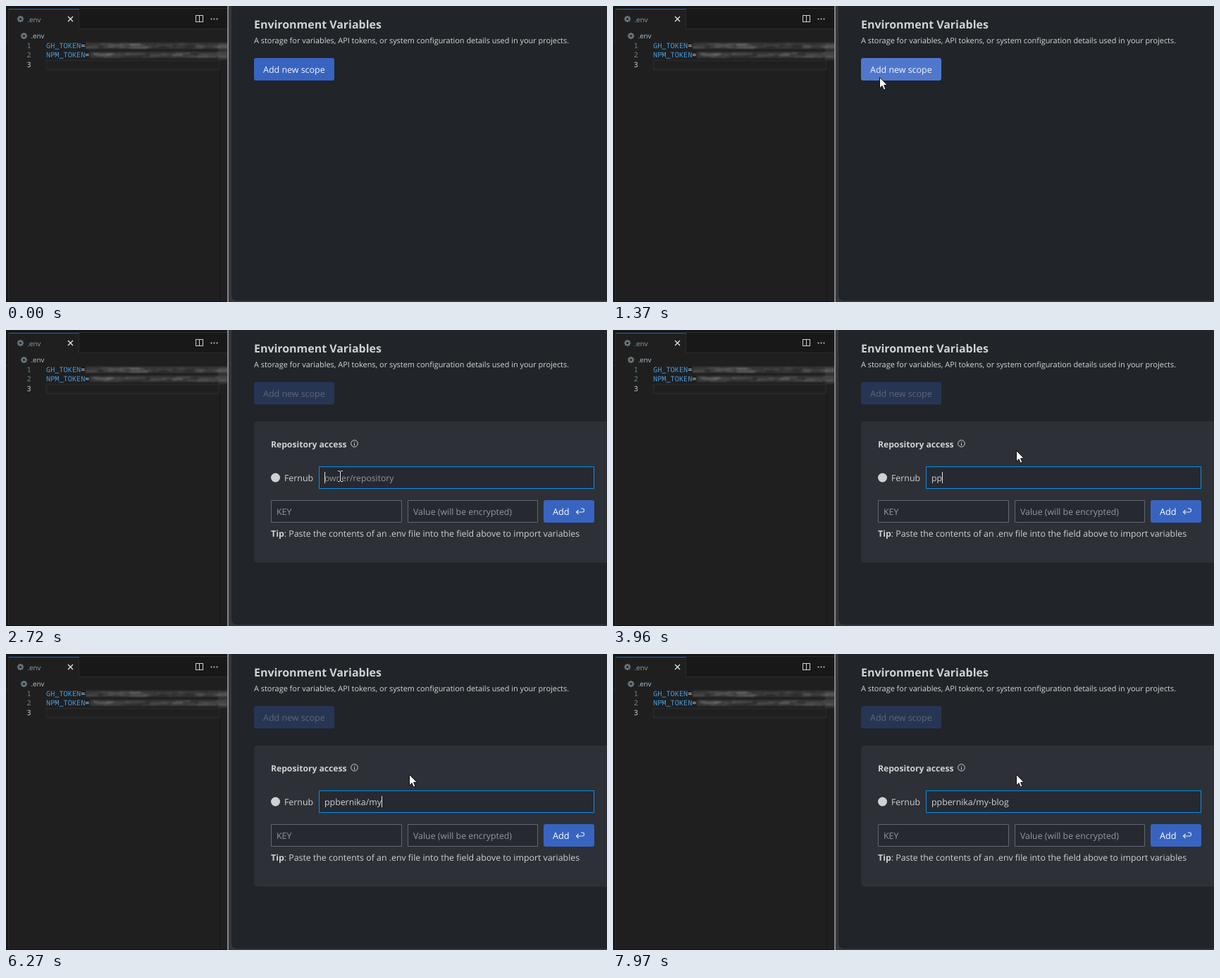
Write an HTML page with a canvas that moves like this. It is 853 px wide and 421 px high and loops after 8 s.

```html
<!DOCTYPE html>
<html lang="en">
<head>
<meta charset="utf-8">
<title>Environment Variables</title>
<style>
  html, body { margin: 0; width: 100%; height: 100%; overflow: hidden; background: #212428; }
  canvas { display: block; width: 853px; height: 421px; }
</style>
</head>
<body>
<canvas id="stage" width="853" height="421"></canvas>
<script>
const LOOP = 8000;
const PANEL_AT = 1560, FOCUS_AT = 2540;
const SANS = '"Open Sans", "Noto Sans", sans-serif';
const MONO = '"Noto Sans Mono", "DejaVu Sans Mono", monospace';
const TEXT = '#d0d2d4', HINT = '#93989d', BODY = 12.35;
const BLUE = '#3864c1', FIELD = '#262a30', EDGE = '#5f6675';

// Typing comes in bursts with an even gap between keys
const KEY_GAP = 130;
const BURSTS = [[3540, 'pp'], [4180, 'bernika'], [5400, '/'], [5980, 'my'], [6480, '-'], [6740, 'blog']];

const ctx = document.getElementById('stage').getContext('2d');

const clamp = v => Math.min(1, Math.max(0, v));
const progress = (t, from, to) => clamp((t - from) / (to - from));
const smooth = k => k * k * (3 - 2 * k);
const mix = (a, b, k) => a + (b - a) * k;

function rect(x, y, w, h, color) {
  ctx.fillStyle = color;
  ctx.fillRect(x, y, w, h);
}

function box(x, y, w, h, r, fill, line) {
  ctx.beginPath();
  ctx.roundRect(x, y, w, h, r);
  ctx.fillStyle = fill;
  ctx.fill();
  if (line) {
    ctx.strokeStyle = line;
    ctx.lineWidth = 1;
    ctx.stroke();
  }
}

function text(str, x, y, size = BODY, color = TEXT, weight = 400, family = SANS) {
  ctx.font = `${weight} ${size}px ${family}`;
  ctx.textRendering = 'geometricPrecision';
  ctx.fillStyle = color;
  ctx.fillText(str, x, y);
  return ctx.measureText(str).width;
}

function lines(color, width, ...paths) {
  ctx.strokeStyle = color;
  ctx.lineWidth = width;
  ctx.beginPath();
  for (const p of paths) {
    p.forEach(([x, y], i) => i ? ctx.lineTo(x, y) : ctx.moveTo(x, y));
  }
  ctx.stroke();
}

function disc(x, y, r, color) {
  ctx.fillStyle = color;
  ctx.beginPath();
  ctx.arc(x, y, r, 0, Math.PI * 2);
  ctx.fill();
}

function random(seed) {
  return () => {
    seed = (seed * 16807) % 2147483647;
    return seed / 2147483647;
  };
}

// Smeared grey strips that hide the two values
function makeSmudge(seed) {
  const layer = document.createElement('canvas');
  layer.width = 314;
  layer.height = 90;
  const g = layer.getContext('2d'), rnd = random(seed);
  g.filter = 'blur(1.2px)';
  [[113, 56.5], [119, 69.5]].forEach(([left, mid]) => {
    g.fillStyle = 'rgba(110,110,110,.32)';
    g.fillRect(left, mid - 4.5, 320 - left, 9);
    for (let i = 0; i < 45; i++) {
      const x = left + rnd() * (306 - left), w = 8 + rnd() * 24;
      const shade = rnd() < .4 ? 30 : 150;
      g.fillStyle = `rgba(${shade},${shade},${shade},${.2 + rnd() * .25})`;
      g.fillRect(x, mid - 3 + rnd() * 5, w, 2);
    }
  });
  g.fillStyle = 'rgba(95,95,95,.3)';
  g.fillRect(301, 53, 14, 24);
  return layer;
}
const smudges = [makeSmudge(41), makeSmudge(977)];

function gear(x, y, color) {
  for (let i = 0; i < 4; i++) {
    const a = i * Math.PI / 4, dx = Math.cos(a) * 4.7, dy = Math.sin(a) * 4.7;
    lines(color, 2, [[x - dx, y - dy], [x + dx, y + dy]]);
  }
  disc(x, y, 3.7, color);
  disc(x, y, 1.6, '#1f1f1f');
}

function drawEditor(t) {
  rect(0, 0, 314, 421, '#181818');
  rect(4, 33, 310, 388, '#1f1f1f');
  rect(4, 4, 99, 29, '#1f1f1f');
  rect(3, 3, 1, 418, '#2b2b2b');
  rect(0, 50, 3, 1, '#2b2b2b');
  rect(104, 3, 210, 1, '#2b2b2b');
  rect(103, 4, 1, 29, '#2b2b2b');
  rect(104, 32, 210, 1, '#2b2b2b');
  rect(4, 4, 100, 1, '#1470c4');
  rect(303, 78, 1, 343, '#141516');
  rect(0, 420, 314, 1, '#141414');

  gear(20.5, 18.5, '#69757c');
  text('.env', 30.5, 22.5, 9.8, '#929ca4');
  lines('#e8e8e8', 1.3, [[88, 15], [95, 22]], [[95, 15], [88, 22]]);
  ctx.strokeStyle = '#d0d0d0';
  ctx.lineWidth = 1;
  ctx.strokeRect(269.5, 13.5, 10, 9);
  lines('#d0d0d0', 1, [[274.5, 13.5], [274.5, 22.5]]);
  for (let i = 0; i < 3; i++) disc(291.5 + i * 4, 18.5, 1, '#d0d0d0');

  gear(25.5, 42.5, '#69757c');
  text('.env', 35.5, 46, 9.8, '#b4c4d0');

  ctx.strokeStyle = '#282828';
  ctx.strokeRect(57.5, 77.5, 245, 13);
  ['GH_TOKEN', 'NPM_TOKEN', ''].forEach((name, i) => {
    const y = 60 + i * 13.3;
    text(i + 1, 29.5, y, 10.25, name ? '#6f848f' : '#d0d0d0', 400, MONO);
    if (!name) return;
    const w = text(name, 57, y, 10.25, '#4a9fdf', 400, MONO);
    text('=', 57 + w, y, 10.25, '#d4d4d4', 400, MONO);
  });

  const shimmer = .12 + .12 * Math.sin(t / 420);
  smudges.forEach((layer, i) => {
    ctx.globalAlpha = i ? shimmer : 1 - shimmer;
    ctx.drawImage(layer, 0, 0);
  });
  ctx.globalAlpha = 1;
}

function drawPage(t, pointer) {
  rect(314, 0, 539, 421, '#35373a');
  rect(314, 0, 2, 421, '#858585');
  box(320, -10, 560, 429, 7, '#212428');

  text('Environment Variables', 352, 32, 15.95, TEXT, 700);
  text('A storage for variables, API tokens, or system configuration details used in your projects.',
       352, 53, 10.91, '#d6d8da');

  const open = t >= PANEL_AT;
  const over = pointer.x >= 352 && pointer.x < 466 && pointer.y >= 74 && pointer.y < 106;
  box(352, 74, 114, 32, 3, open ? '#273554' : over ? '#4f78cd' : BLUE);
  text('Add new scope', 365, 95, 12.46, open ? '#626770' : '#f4f6f9');
  if (open) drawPanel(t);
}

function drawPanel(t) {
  const focused = t >= FOCUS_AT;
  box(352, 130, 520, 201, 5, '#2d3036');
  text('Repository access', 376, 167, 12.15, TEXT, 700);

  ctx.strokeStyle = TEXT;
  ctx.lineWidth = 1;
  ctx.beginPath();
  ctx.arc(494.5, 161.5, 4.8, 0, Math.PI * 2);
  ctx.stroke();
  rect(494, 159, 1, 1, TEXT);
  rect(494, 161, 1, 3.5, TEXT);

  disc(382.5, 210, 6.5, '#cfd1d3');
  text('Fernub', 395, 215);

  box(444.5, 194.5, 390, 31, 0, FIELD, focused ? '#0d8eec' : EDGE);
  box(376.5, 242.5, 185, 31, 0, FIELD, EDGE);
  box(570.5, 242.5, 184, 31, 0, FIELD, EDGE);
  text('KEY', 384, 263, BODY, HINT);
  text('Value (will be encrypted)', 578, 263, BODY, HINT);

  box(763, 242, 72, 32, 3, BLUE);
  text('Add', 776, 263, 12.7, '#ffffff');
  ctx.strokeStyle = '#e6eaf2';
  ctx.lineWidth = 1.1;
  ctx.beginPath();
  ctx.moveTo(812.5, 256);
  ctx.lineTo(809.5, 259);
  ctx.lineTo(812.5, 262);
  ctx.moveTo(809.5, 259);
  ctx.lineTo(818, 259);
  ctx.arc(818, 256.5, 2.5, Math.PI / 2, -Math.PI / 2, true);
  ctx.lineTo(816, 254);
  ctx.stroke();

  const tip = text('Tip', 376, 294, BODY, TEXT, 700);
  text(': Paste the contents of an .env file into the field above to import variables', 376 + tip, 294);

  drawEntry(t, focused);
}

function drawEntry(t, focused) {
  let typed = '', lastKey = FOCUS_AT;
  for (const [start, keys] of BURSTS) {
    if (t < start) break;
    const count = Math.min(keys.length, 1 + Math.floor((t - start) / KEY_GAP));
    typed += keys.slice(0, count);
    lastKey = start + (count - 1) * KEY_GAP;
  }
  if (!typed) text('owner/repository', 452, 215, 12.2, HINT);
  const width = typed ? text(typed, 452, 215) : 0;
  if (focused && (t - lastKey) % 1060 < 530) {
    rect(Math.round(452 + width), 202, 1, 16, '#e0e0e0');
  }
}

// A curved approach to the button, then three straight moves
function pointerAt(t) {
  const k = 1 - (1 - progress(t, 280, 1150)) ** 1.6;
  const bend = (a, b, c) => mix(mix(a, b, k), mix(b, c, k), k);
  let x = bend(480, 297, 378), y = bend(424, 231, 101);
  const move = (from, to, toX, toY) => {
    const m = smooth(progress(t, from, to));
    x = mix(x, toX, m);
    y = mix(y, toY, m);
  };
  move(1420, 1600, 375, 106);
  move(1900, 2400, 474, 208);
  move(2780, 3160, 572, 171);
  return { x, y };
}

function drawPointer(t, { x, y }) {
  ctx.save();
  ctx.translate(Math.round(x), Math.round(y));
  const inField = t >= PANEL_AT && x > 444 && x < 835 && y > 194 && y < 226;
  if (inField) {
    const serif = y => [[-3, y], [-1, y], [.5, y * .87], [2, y], [4, y]];
    const bar = [serif(-7.5), [[.5, -6.5], [.5, 6.5]], serif(7.5)];
    lines('#14171a', 2.4, ...bar);
    lines('#f0f0f0', 1, ...bar);
  } else {
    ctx.beginPath();
    [[.5, .5], [.5, 16], [4, 12.6], [6.4, 18.2], [9, 17.1], [6.6, 11.7], [11.4, 11.7]]
      .forEach(p => ctx.lineTo(...p));
    ctx.closePath();
    ctx.fillStyle = '#ffffff';
    ctx.fill();
    ctx.strokeStyle = '#0c0c0c';
    ctx.lineWidth = 1;
    ctx.stroke();
  }
  ctx.restore();
}

function frame() {
  const t = performance.now() % LOOP;
  const pointer = pointerAt(t);
  drawEditor(t);
  drawPage(t, pointer);
  drawPointer(t, pointer);
  requestAnimationFrame(frame);
}
frame();
</script>
</body>
</html>
```
